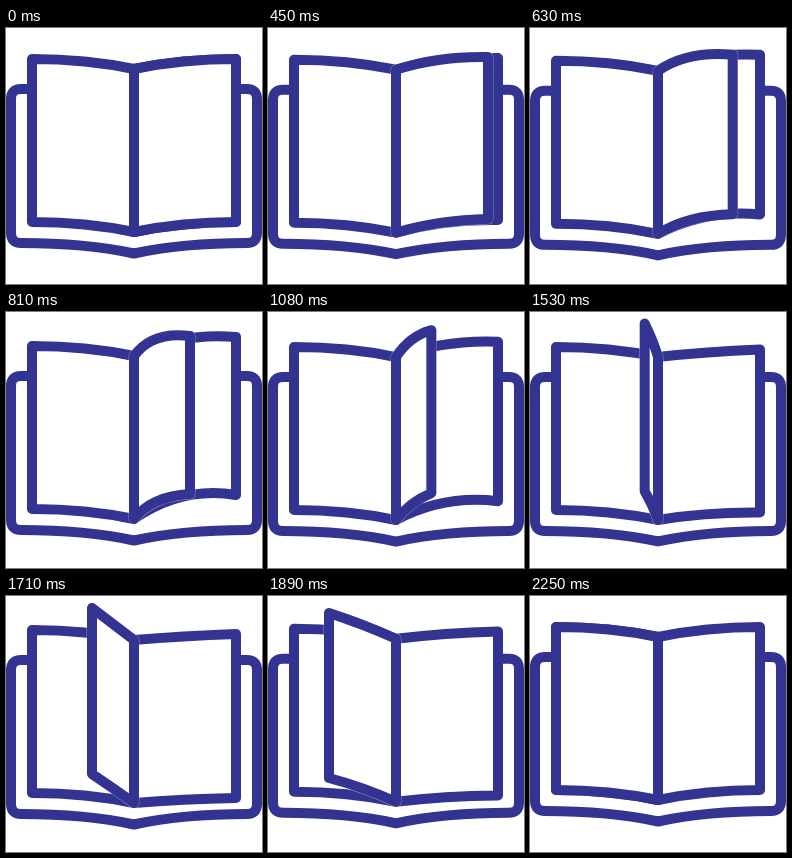
An HTML page for the animation above (2520 ms loop, 256 by 256 pixels).

```html
<!DOCTYPE html>
<html lang="en">
<head>
<meta charset="utf-8">
<title>Book turning a page</title>
<style>
html, body { margin: 0; width: 100%; height: 100%; overflow: hidden; background: #fff; }
svg { display: block; width: 100%; height: 100%; }
path { fill: #fff; stroke: #333391; stroke-width: 10; stroke-linejoin: round; stroke-linecap: butt; }
#rim { fill: none; stroke: #fff; stroke-width: 10.8; stroke-opacity: .5; }
</style>
</head>
<body>
<svg viewBox="0 0 256 256">
  <g id="base">
    <path d="M25 61H15Q5 61 5 71V205Q5 215 15 215Q80 215 128 225.5Q176 215 241 215Q251 215 251 205V71Q251 61 241 61H231"/>
    <path id="left"/>
  </g>
  <path id="right"/>
  <path id="rim"/>
  <path id="leaf"/>
</svg>
<script>
const LOOP = 2520, STEP = 90, LAST = 23;

// step, sink | right page: top, top bend, bottom, bottom bend |
// turning leaf: x, top, bottom, bend x, top bend, bottom bend
const KEYS = [
  [0, 0, 31, 31, 194, 194, 230, 31, 194, 176, 31, 194],
  [3, .7, 30, 30, 192, 191, 220, 29, 191, 170, 28, 192],
  [7, 3, 25, 20, 183, 174, 184, 24, 182, 146, 19, 184],
  [13, 4.5, 35.5, 37, 197.5, 195, 140, 13, 181, 137, 30, 196],
  [17, 3, 38, 40, 202, 203, 86, 12, 178, 107, 28, 192],
  [19, 1.8, 35.5, 37, 199.5, 200, 61, 17, 182, 95, 28, 191],
  [LAST, 0, 31, 31, 194, 194, 26, 31, 194, 80, 31, 194]
];

const el = id => document.getElementById(id);

function slope(i, col) {
  const a = KEYS[i - 1], b = KEYS[i + 1];
  return a && b ? (b[col] - a[col]) / (b[0] - a[0]) : 0;
}

// Smooth curve through the keys
function pose(n) {
  let i = 0;
  while (i < KEYS.length - 2 && n >= KEYS[i + 1][0]) i++;
  const a = KEYS[i], b = KEYS[i + 1], span = b[0] - a[0];
  const u = (n - a[0]) / span, v = 1 - u;
  return a.map((_, c) =>
    v * v * (1 + 2 * u) * a[c] + u * u * (3 - 2 * u) * b[c] +
    span * u * v * (v * slope(i, c) - u * slope(i + 1, c)));
}

function page(sink, x, top, bottom, bendX, topBend, bottomBend) {
  return `M128 ${41 + sink}Q${bendX} ${topBend} ${x} ${top}V${bottom}` +
    `Q${bendX} ${bottomBend} 128 ${204 + sink}Z`;
}

function draw(time) {
  const n = Math.min(LAST, Math.max(0, Math.floor(time % LOOP / STEP) - 2));
  const [, sink, top, topBend, bottom, bottomBend, ...leaf] = pose(n);
  const turning = page(sink, ...leaf);
  el("base").setAttribute("transform", `translate(0 ${sink})`);
  el("right").setAttribute("d", page(sink, 230, top, bottom, 176, topBend, bottomBend));
  el("leaf").setAttribute("d", turning);
  el("rim").setAttribute("d", n % LAST ? turning : "");
}

el("left").setAttribute("d", page(0, 26, 31, 194, 80, 31, 194));

const start = performance.now();
function tick() {
  draw(performance.now() - start);
  requestAnimationFrame(tick);
}
tick();
</script>
</body>
</html>
```
